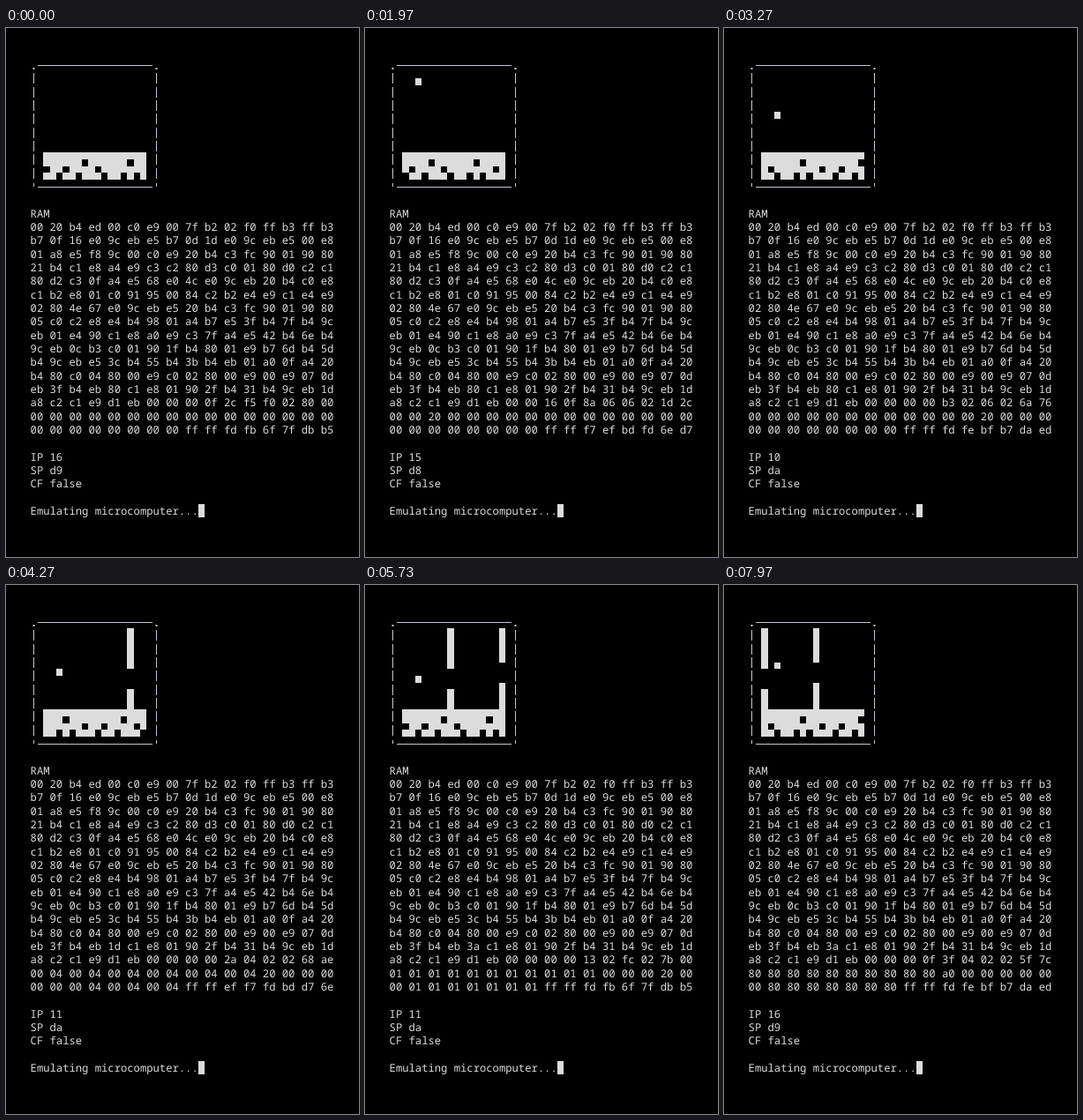
An HTML page with a canvas for the animation above (8000 ms loop, 400 by 600 pixels).

```html
<!DOCTYPE html>
<html lang="en">
<head>
<meta charset="utf-8">
<title>Emulating microcomputer</title>
<style>
  html, body { margin: 0; width: 100%; height: 100%; overflow: hidden; background: #000; }
  canvas { display: block; width: 400px; height: 600px; }
</style>
</head>
<body>
<canvas id="stage" width="400" height="600"></canvas>
<script>
const ctx = document.getElementById('stage').getContext('2d');

const LOOP = 8000, LEFT = 27.6, COL = 7.32, ROW = 15.33;
const SCREEN_TOP = 49.3, PIXEL_H = ROW / 2;
const INK = '#dcdcdc', BORDER = '#c6c6d4';

// Program memory, 00 to df
const PROGRAM = `
00 20 b4 ed 00 c0 e9 00 7f b2 02 f0 ff b3 ff b3
b7 0f 16 e0 9c eb e5 b7 0d 1d e0 9c eb e5 00 e8
01 a8 e5 f8 9c 00 c0 e9 20 b4 c3 fc 90 01 90 80
21 b4 c1 e8 a4 e9 c3 c2 80 d3 c0 01 80 d0 c2 c1
80 d2 c3 0f a4 e5 68 e0 4c e0 9c eb 20 b4 c0 e8
c1 b2 e8 01 c0 91 95 00 84 c2 b2 e4 e9 c1 e4 e9
02 80 4e 67 e0 9c eb e5 20 b4 c3 fc 90 01 90 80
05 c0 c2 e8 e4 b4 98 01 a4 b7 e5 3f b4 7f b4 9c
eb 01 e4 90 c1 e8 a0 e9 c3 7f a4 e5 42 b4 6e b4
9c eb 0c b3 c0 01 90 1f b4 80 01 e9 b7 6d b4 5d
b4 9c eb e5 3c b4 55 b4 3b b4 eb 01 a0 0f a4 20
b4 80 c0 04 80 00 e9 c0 02 80 00 e9 00 e9 07 0d
eb 3f b4 eb 80 c1 e8 01 90 2f b4 31 b4 9c eb 1d
a8 c2 c1 e9 d1 eb 00 00 00 00 00 00 00 00 00 00`.trim().split(/\s+/);

// Delay loop: 7 x 256 turns per game tick, 7 instructions per turn
const TICK = 1792;
const STACK_DEPTH = [0, 0, 0, 1, 2, 2, 1];
// [time, turns done, instruction within the turn]
const PACE = [
  [0, -62764, 6], [1970, 37750, 5], [3270, 105037, 0], [4270, 154838, 1],
  [5730, 228845, 1], [6870, 285710, 3], [7970, 339393, 6]
].map(([t, turns, step]) => [t, turns + (step + 0.5) / 7]);

const FLAPS = [30, 45, 61, 77, 92, 108, 124, 140, 154, 167, 180];
const GROUND = [0xffff, 0xfdfb, 0x6f7f, 0xdbb5];
const PIPES = [{ born: 8, gap: 6 }, { born: 16, gap: 5 }];

const hex = n => (n & 255).toString(16).padStart(2, '0');
const rotate = (word, k) => ((word << k) | (word >>> (16 - k))) & 0xffff;

function turnsAt(t) {
  let i = 1;
  while (i < PACE.length - 1 && t > PACE[i][0]) i++;
  const [t0, a] = PACE[i - 1], [t1, b] = PACE[i];
  return a + (b - a) * (t - t0) / (t1 - t0);
}

function birdAt(tick) {
  let height = 0x80, speed = -16;
  for (let n = 1; n <= tick; n++) {
    speed++;
    height += speed;
    if (FLAPS.includes(n) && n < tick) speed = -8;
  }
  return { height, speed };
}

function videoRows(tick, bird) {
  const scroll = tick >> 3;
  const rows = new Array(12).fill(0);
  for (const { born, gap } of PIPES) {
    const x = 15 - (scroll - born);
    if (x > 15 || x < 0) continue;
    for (let y = 0; y < 12; y++) {
      if (y < gap || y > gap + 2) rows[y] |= 0x8000 >> x;
    }
  }
  if (tick > 0) rows[bird.height >> 4] |= 0x2000;
  return rows.concat(GROUND.map(word => rotate(word, scroll & 15)));
}

function machineAt(t) {
  const turns = turnsAt(t), whole = Math.floor(turns);
  const step = Math.floor((turns - whole) * 7);
  const tick = Math.max(0, Math.floor(whole / TICK) + 1);
  const left = tick * TICK - whole;
  const depth = STACK_DEPTH[step];
  const bird = birdAt(tick);
  const rows = videoRows(tick, bird);
  const ram = PROGRAM.slice();
  ram[0xc4] = tick < 64 ? '80' : tick < 128 ? '1d' : '3a';
  const stack = [depth > 1 ? 0x16 : 0, depth ? 0x0f : 0, left, left >> 8,
                 bird.speed, 2, bird.height, tick * 2];
  stack.forEach((value, i) => { ram[0xd8 + i] = hex(value); });
  for (const word of rows) ram.push(hex(word >> 8), hex(word));
  return { ram, rows, ip: hex(0x10 + step), sp: hex(0xda - depth) };
}

function box(x0, y0, x1, y1) {
  x0 = Math.round(x0);
  y0 = Math.round(y0);
  ctx.fillRect(x0, y0, Math.round(x1) - x0, Math.round(y1) - y0);
}

function drawBorder() {
  ctx.fillStyle = BORDER;
  for (const y of [42, 180]) ctx.fillRect(36, y, 130, 1);
  for (const x of [31, 170]) {
    ctx.fillRect(x - 0.5, 45, 2, 2);
    ctx.fillRect(x, 176, 1, 4);
    for (let i = 0; i < 8; i++) {
      ctx.fillRect(x, Math.round(SCREEN_TOP + i * ROW + 2), 1, 12);
    }
  }
}

function drawScreen(rows) {
  ctx.fillStyle = INK;
  rows.forEach((word, y) => {
    const top = SCREEN_TOP + y * PIXEL_H;
    for (let x = 0; x < 16; x++) {
      const left = LEFT + (x + 2) * COL;
      if (word & (0x8000 >> x)) box(left, top, left + COL, top + PIXEL_H);
    }
  });
}

function drawText({ ram, ip, sp }) {
  const lines = ['RAM'];
  for (let i = 0; i < 256; i += 16) lines.push(ram.slice(i, i + 16).join(' '));
  lines.push('', 'IP ' + ip, 'SP ' + sp, 'CF false', '', 'Emulating microcomputer...');
  ctx.fillStyle = INK;
  ctx.font = '12.2px "Noto Sans Mono", "Liberation Mono", monospace';
  ctx.textRendering = 'geometricPrecision';
  lines.forEach((line, i) => ctx.fillText(line, LEFT, Math.round(214.6 + i * ROW)));
  const cursor = LEFT + 26 * COL;
  box(cursor, 540, cursor + COL, 555);
}

function draw(t) {
  // 30 pictures a second, each starting on a hundredth of a second
  const picture = Math.floor((Math.floor(t / 10) + 0.5) * 0.3);
  const machine = machineAt(Math.round(picture * 10 / 3) * 10);
  ctx.fillStyle = '#000';
  ctx.fillRect(0, 0, 400, 600);
  drawBorder();
  drawScreen(machine.rows);
  drawText(machine);
}

const start = performance.now();
function play() {
  draw((performance.now() - start) % LOOP);
  requestAnimationFrame(play);
}
play();
</script>
</body>
</html>
```
